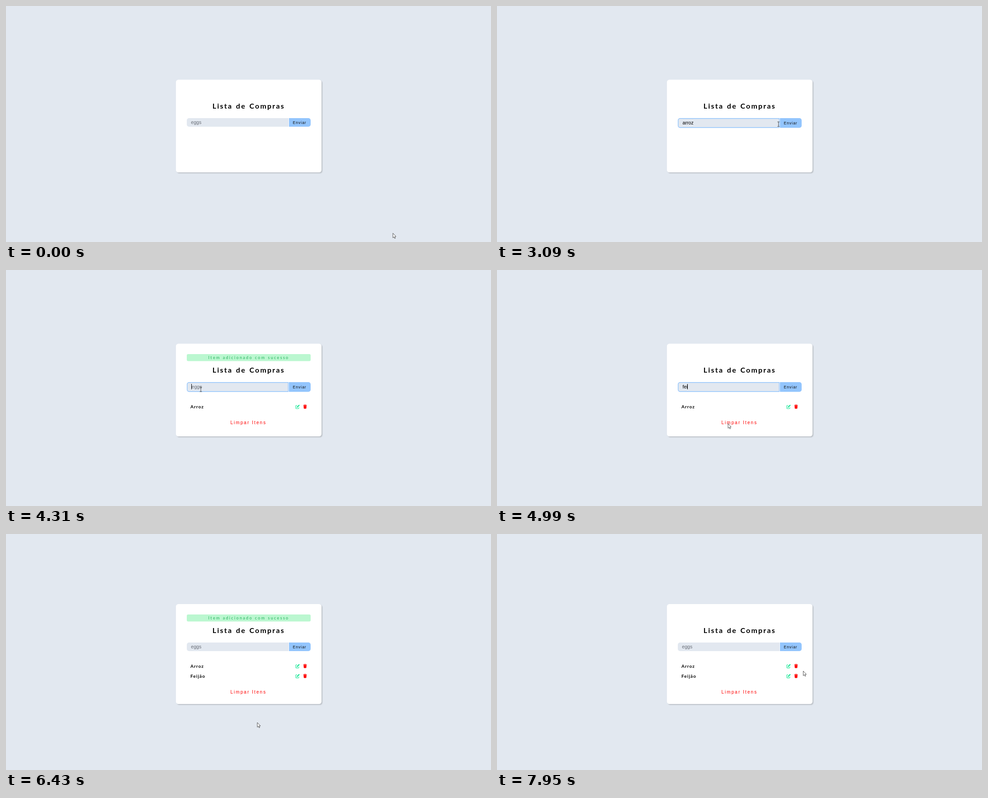
Write an HTML page with a canvas that moves like this. It is 1073 px wide and 522 px high and loops after 8000 ms.

```html
<!DOCTYPE html>
<html lang="pt">
<head>
<meta charset="utf-8">
<title>Lista de Compras</title>
<style>
  html, body { margin: 0; width: 100%; height: 100%; overflow: hidden; background: #e2e8f0; }
  canvas { display: block; }
</style>
</head>
<body>
<canvas id="stage" width="1073" height="522"></canvas>
<script>
const ctx = document.getElementById('stage').getContext('2d');
const LOOP = 8000, TICK = 67.3, ALERT_TIME = 1050;
const SLATE = '#e2e8f0', BLUE = '#93c5fd', RED = '#ff0000', INK = '#000';
const SANS = '"Liberation Sans", Arial, sans-serif', ROUND = 'Lato, sans-serif';

// Each round: focus the field, type a word at a steady pace, send it
const rounds = [
  { word: 'arroz', focus: 1020, type: 1620, pace: 210, send: 3500 },
  { word: 'feijão', focus: 4310, type: 4650, pace: 150, send: 5880 }
];

// Eased pointer moves between resting places
const start = { x: 856, y: 502.5 };
const field = { x: 490.5, y: 257.5 }, button = { x: 647, y: 262 };
const moves = [
  { from: 0, to: 740, ...field },
  { from: 2690, to: 3230, ...button },
  { from: 3450, to: 3700, x: 570, y: 303 },
  { from: 3700, to: 4180, x: 431, y: 264 },
  { from: 4450, to: 5250, x: 540, y: 367 },
  { from: 5340, to: 5740, ...button },
  { from: 5900, to: 6393, x: 556, y: 417 },
  { from: 6460, to: 6970, x: 665, y: 288 },
  { from: 6970, to: 7400, x: 520, y: 285 },
  { from: 7400, to: 7940, x: 677.5, y: 303 }
];

const arrow = new Path2D('M0 0V10.3L2.4 8.2L4 11.7L5.5 11L4 7.7L6.9 7.4Z');
const hand = new Path2D('M-1.3 8V1Q-1.3 0 -.2 0Q.9 0 .9 1V5Q2 4 3 5.2Q4.2 4.6 5 5.8Q6.7 5.5 6.8 7V10Q6.5 12 5.3 13.8H-.2Q-1.6 11.4 -3.9 8.8Q-4.2 7 -2.6 7Z');
const fingers = new Path2D('M.9 5V7.5M3 5.2V7.7M5 5.8V8');
const beam = new Path2D('M-2.5 -5H2.5M0 -5V5M-2.5 5H2.5');
const sheet = new Path2D('M3.9 2.2H2Q.7 2.2 .7 3.4V8.3Q.7 9.4 2 9.4H6.4Q7.6 9.4 7.6 8.3V6.4');
const pencil = new Path2D('M3 5.3L7.2 1.1Q8 .3 8.9 1.2Q9.7 2 8.9 2.8L4.7 7L2.6 7.4Z');
const bin = new Path2D('M0 .8H2.2L2.7 0H4.9L5.4 .8H7.6V1.9H0ZM.5 2.5H7.1L6.6 8.2Q6.5 9 5.7 9H1.9Q1.1 9 1 8.2Z');

const within = (t, from, to) => t >= from && t < to;

function pointerAt(t) {
  let { x, y } = start;
  for (const move of moves) {
    const u = Math.min(1, Math.max(0, (t - move.from) / (move.to - move.from)));
    const eased = u * u * (3 - 2 * u);
    x += (move.x - x) * eased;
    y += (move.y - y) * eased;
  }
  return [x, y];
}

function text(str, x, y, font, color, spacing = 0, words = 0) {
  ctx.font = font;
  ctx.letterSpacing = spacing + 'px';
  ctx.wordSpacing = words + 'px';
  ctx.fillStyle = color;
  ctx.fillText(str, x, y);
}

function box(x, y, w, h, r, color) {
  ctx.beginPath();
  ctx.roundRect(x, y, w, h, r);
  ctx.fillStyle = color;
  ctx.fill();
}

function at(x, y, draw) {
  ctx.save();
  ctx.translate(x, y);
  draw();
  ctx.restore();
}

function drawForm(t, round) {
  const height = round ? 21.5 : 19, base = round ? 262 : 261;
  box(400, 248, 225, height, [5, 0, 0, 5], SLATE);
  box(626, 248, 48, height, [0, 5, 5, 0], BLUE);
  text('Enviar', 634.6, base - .4, '8.5px ' + SANS, '#111', 1);

  const count = round ? Math.max(0, Math.floor((t - round.type) / round.pace) + 1) : 0;
  const value = count ? round.word.slice(0, count) : '';
  const x = round ? 410.5 : 409.2;
  text(value || 'eggs', x, base, '10.67px ' + SANS, value ? INK : '#6b7079');
  if (!round) return;

  ctx.beginPath();
  ctx.roundRect(400.7, 248.7, 223.8, 20.1, [4.5, 0, 0, 4.5]);
  ctx.strokeStyle = BLUE;
  ctx.lineWidth = 1.4;
  ctx.stroke();
  const lastKey = value ? round.type + (value.length - 1) * round.pace : round.focus;
  if ((t - lastKey) % 920 < 460) {
    ctx.fillStyle = INK;
    ctx.fillRect(Math.floor(x + ctx.measureText(value).width), 252, 1, 12);
  }
}

function drawRow(name, y) {
  text(name, 408, y + 3.7, 'bold 10px ' + ROUND, INK, 1.1);
  at(640.3, y - 5, () => {
    ctx.strokeStyle = ctx.fillStyle = '#1ee698';
    ctx.lineWidth = 1.1;
    ctx.stroke(sheet);
    ctx.fill(pencil);
  });
  at(657.8, y - 4.5, () => {
    ctx.fillStyle = RED;
    ctx.fill(bin);
  });
}

function drawPointer(t, listTop, listBottom, lift) {
  const [x, y] = pointerAt(Math.floor((t + 5) / TICK) * TICK);
  const py = y + lift, inside = within(x, 400, 674);
  const inForm = inside && within(py, 248, 268);
  const inList = inside && within(py, listTop, listBottom);
  const shape = inForm && x < 626 ? beam : inForm || inList ? hand : arrow;

  const pressed = rounds.some(r => within(t, r.focus - 80, r.focus) || within(t, r.send - 140, r.send));
  if (pressed) box(x - 7.5, y - 5.5, 15, 15, 7.5, 'rgba(255,255,0,.5)');
  at(x, y, () => {
    ctx.lineJoin = 'round';
    ctx.lineWidth = .8;
    ctx.strokeStyle = '#2a2a2a';
    ctx.fillStyle = '#fff';
    if (shape !== beam) ctx.fill(shape);
    ctx.stroke(shape);
    if (shape === hand) ctx.stroke(fingers);
  });
}

function draw(t) {
  const items = rounds.filter(r => t >= r.send).map(r => r.word[0].toUpperCase() + r.word.slice(1));
  const active = rounds.find(r => within(t, r.focus, r.send));
  const lift = items.length > 1 ? 8 : 0;
  const top = active ? 302.3 : 300, bottom = top + 22 * items.length;

  ctx.fillStyle = SLATE;
  ctx.fillRect(0, 0, 1073, 522);
  at(0, -lift, () => {
    at(0, 0, () => {
      ctx.shadowColor = 'rgba(0,0,0,.17)';
      ctx.shadowOffsetX = ctx.shadowOffsetY = 2;
      ctx.shadowBlur = 2;
      box(376, 163, 322, 205 + 2 * lift, 5.5, '#fff');
    });
    if (rounds.some(r => within(t, r.send, r.send + ALERT_TIME))) {
      box(400, 186, 274, 15.4, 3, '#bbf7d0');
      text('Item adicionado com sucesso', 447.6, 197, '500 9px ' + ROUND, '#2fb864', 2.32, .3);
    }
    text('Lista de Compras', 456.8, 227, 'bold 16px ' + ROUND, INK, 2.2, 1.5);
    drawForm(t, active);
    items.forEach((name, i) => drawRow(name, top + 22 * i));
    if (items.length) text('Limpar Itens', 496.4, bottom + 17, '10px ' + SANS, RED, 2.07);
  });
  drawPointer(t, top - 11, bottom - 11, lift);
}

function frame() {
  draw(performance.now() % LOOP);
  requestAnimationFrame(frame);
}
frame();
</script>
</body>
</html>
```
